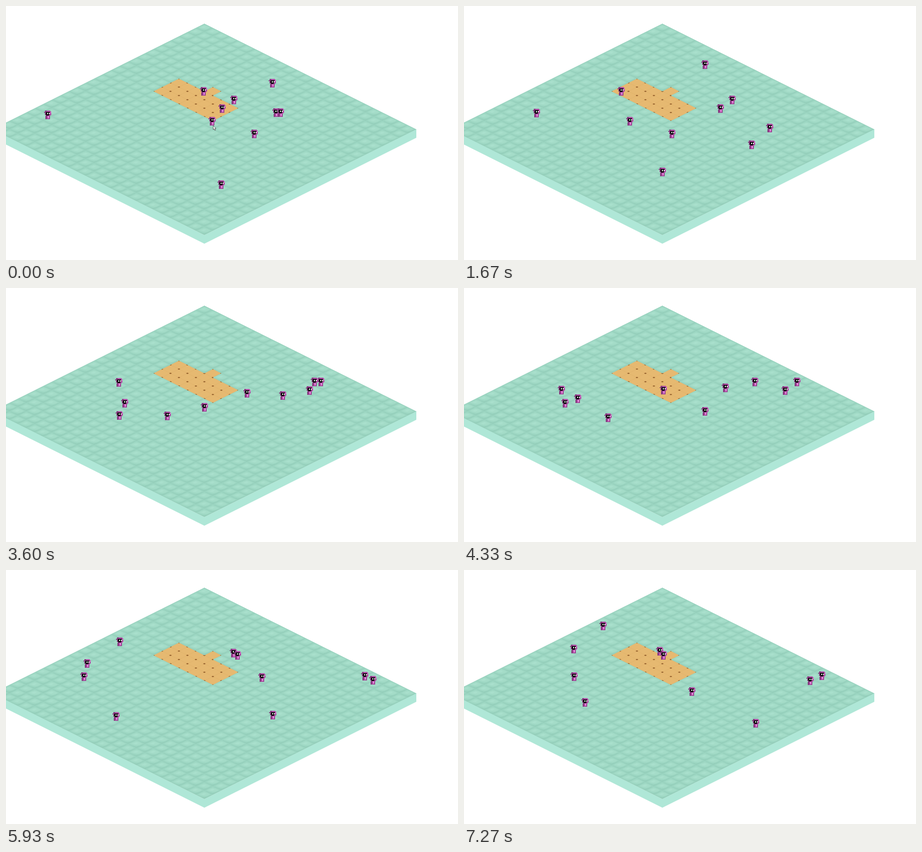
An HTML page that plays this animation: 998 px wide and 561 px high, repeating every 7.34 s.

```html
<!DOCTYPE html>
<html lang="en">
<head>
<meta charset="utf-8">
<title>Isometric walkers</title>
<style>
  html, body { margin: 0; width: 100%; height: 100%; overflow: hidden; background: #fff; }
  svg { display: block; width: 100%; height: 100%; }
</style>
</head>
<body>
<svg viewBox="0 0 998 561">
  <defs>
    <g id="tile">
      <path d="M-13 -1L-6 -4.5L0 -6.5L6 -4.5L13 -1L8 1.5L2 3L-5 2Z" fill="#a4dcc8"/>
      <path d="M-8 -1L-1 -4L5 -3L-1 .5Z" fill="#a9e0cd"/>
      <path d="M18.7 0L0 9.3L-18.7 0L-14 .8L-8 3.8L-1 5.4L6 4L14 .2Z" fill="#95cfbb"/>
    </g>
    <pattern id="grass" x="419.28" y="39" width="37.44" height="18.68" patternUnits="userSpaceOnUse">
      <rect width="38" height="19" fill="#9dd7c3"/>
      <use href="#tile" x="18.72" y="9.34"/>
      <use href="#tile"/>
      <use href="#tile" x="37.44"/>
      <use href="#tile" y="18.68"/>
      <use href="#tile" x="37.44" y="18.68"/>
    </pattern>
    <clipPath id="patch"><path id="patchShape"/></clipPath>
    <g id="walker" shape-rendering="crispEdges">
      <path d="M-6 -9H6V-7H8V1H6V3H-4V1H-6V-4H-8V-6H-6Z" fill="#b04ca5"/>
      <path d="M-8 -6h4v2h-4zM-6 -9h4v2h-4zM-6 -3h2v4h-2zM-4 1h2v2h-2z" fill="#7d3476"/>
      <path d="M-4 -6H5V0H3V2H-3V0H-4Z" fill="#0c060c"/>
      <path d="M-1 -4h2v3h-2zM3 -4h2v3h-2z" fill="#fff"/>
      <path d="M6 -6h2v3h-2z" fill="#d476c9"/>
      <path d="M-5 3H5V10H-5Z" fill="#a8459d"/>
      <path d="M-5 3h3v7h-3zM4 3h1v7h-1z" fill="#86397e"/>
      <path d="M0 3h3v5h-3z" fill="#e287d8"/>
    </g>
  </defs>
  <path d="M-30 272L438 506L906 272V291L438 525L-30 291Z" fill="#afe7d7"/>
  <path d="M438 39L906 272.5L438 506L-30 272.5Z" fill="url(#grass)"/>
  <path d="M-30 273.2L438 39.7L906 273.2" fill="none" stroke="#95cfbb" stroke-width=".8"/>
  <g id="sand" clip-path="url(#patch)"></g>
  <g id="crowd"></g>
  <path id="cursor" d="M.5 .5V9L2.6 7.2L4.1 10.8L5.6 10.2L4.2 6.7H7Z" fill="#fff" stroke="#333" stroke-width=".8"/>
</svg>
<script>
const NS = 'http://www.w3.org/2000/svg';
const $ = id => document.getElementById(id);
const HALF_W = 18.72, HALF_H = 9.34;
const LOOP = 7340, STEP = 200 / 3;

// Diagonal grid: a counts half tiles to the right, b half tiles down.
const place = (a, b) => [438 + a * HALF_W, 39 + b * HALF_H];

function add(parent, name, attrs) {
  const el = document.createElementNS(NS, name);
  for (const key in attrs) el.setAttribute(key, attrs[key]);
  return parent.appendChild(el);
}

function drawSand() {
  const corners = [[-3, 13], [0, 16], [1, 15], [2, 16], [1, 17], [4, 20], [1, 23], [-6, 16]];
  const d = 'M' + corners.map(c => place(...c)).join('L') + 'Z';
  $('patchShape').setAttribute('d', d);
  add($('sand'), 'path', { d, fill: '#e6b971' });
  let lines = '', dots = '';
  for (let u = 5; u <= 12; u++) {
    lines += `M${place(u - 7, u + 7)}L${place(u - 11, u + 11)}`;
    for (let v = 7; v <= 11; v++) {
      const [x, y] = place(u - v, u + v);
      dots += `M${x - 3} ${y}l3 -1.5l3 1.5l-3 1.5z`;
    }
  }
  for (let v = 7; v <= 11; v++) lines += `M${place(5 - v, 5 + v)}L${place(12 - v, 12 + v)}`;
  add($('sand'), 'path', { d: lines, stroke: '#dfb069', 'stroke-width': .7, fill: 'none' });
  add($('sand'), 'path', { d: dots, fill: '#935f2c' });
}

const DIRS = {
  E: [2, 0], W: [-2, 0], N: [0, -2], S: [0, 2],
  NE: [1, -1], NW: [-1, -1], SE: [1, 1], SW: [-1, 1]
};

// Steps needed to cross one tile.
const tileTime = dir => dir.length > 1 ? 6 : 'EW'.includes(dir) ? 10.5 : 5.25;

// Route: tile counts with compass directions.
function walker(a, b, route) {
  const legs = route.split(' ').map(token => {
    const n = parseFloat(token), dir = token.replace(/[\d.]+/, '');
    const from = place(a, b);
    a += DIRS[dir][0] * n;
    b += DIRS[dir][1] * n;
    return { from, to: place(a, b), time: n * tileTime(dir) };
  });
  return { el: add($('crowd'), 'use', { href: '#walker' }), legs };
}

function locate(legs, k) {
  for (const { from, to, time } of legs) {
    if (k <= time) return from.map((p, i) => Math.round(p + (to[i] - p) * k / time));
    k -= time;
  }
  return legs[legs.length - 1].to.map(Math.round);
}

drawSand();
const walkers = [
  walker(-18.46, 21.54, '0.54NW 2E 5SE 7N 5NE'),
  walker(-.1, 16, '3.95W 6SW 2N 6NE'),
  walker(2.1, 20, '7.95E 2SE 3W'),
  walker(.9, 23, '6.95W 2NW 4E'),
  walker(3.46, 18, '6.27E 5SE 4NW'),
  walker(8, 14, '3NW 1N 9S 6SE 3N'),
  walker(8.44, 21, '0.28E 4SE 3N 1NE 2W 9SW'),
  walker(9, 21, '3S 2SE 3N 8NW 4W'),
  walker(5.9, 26, '5.95W 5SW 1N 5NE'),
  walker(2, 38, '2SW 10N 4NE 4W')
];

function stepAt(t) {
  const k = Math.floor(t / STEP + .06);
  return Math.round(k * STEP / 10) * 10 > t ? k - 1 : k;
}

function render(k) {
  for (const w of walkers) {
    [w.x, w.y] = locate(w.legs, k);
    w.el.setAttribute('transform', `translate(${w.x} ${w.y})`);
  }
  [...walkers].sort((p, q) => p.y - q.y).forEach(w => $('crowd').appendChild(w.el));
  const slide = Math.max(0, k - 3) / 2;
  $('cursor').setAttribute('transform', `translate(${457 + 220 * slide} ${264 - 132 * slide})`);
  $('cursor').style.display = slide > 1 ? 'none' : '';
}

let shown = -1;
function tick() {
  const k = stepAt(performance.now() % LOOP);
  if (k !== shown) render(shown = k);
  requestAnimationFrame(tick);
}
tick();
</script>
</body>
</html>
```
